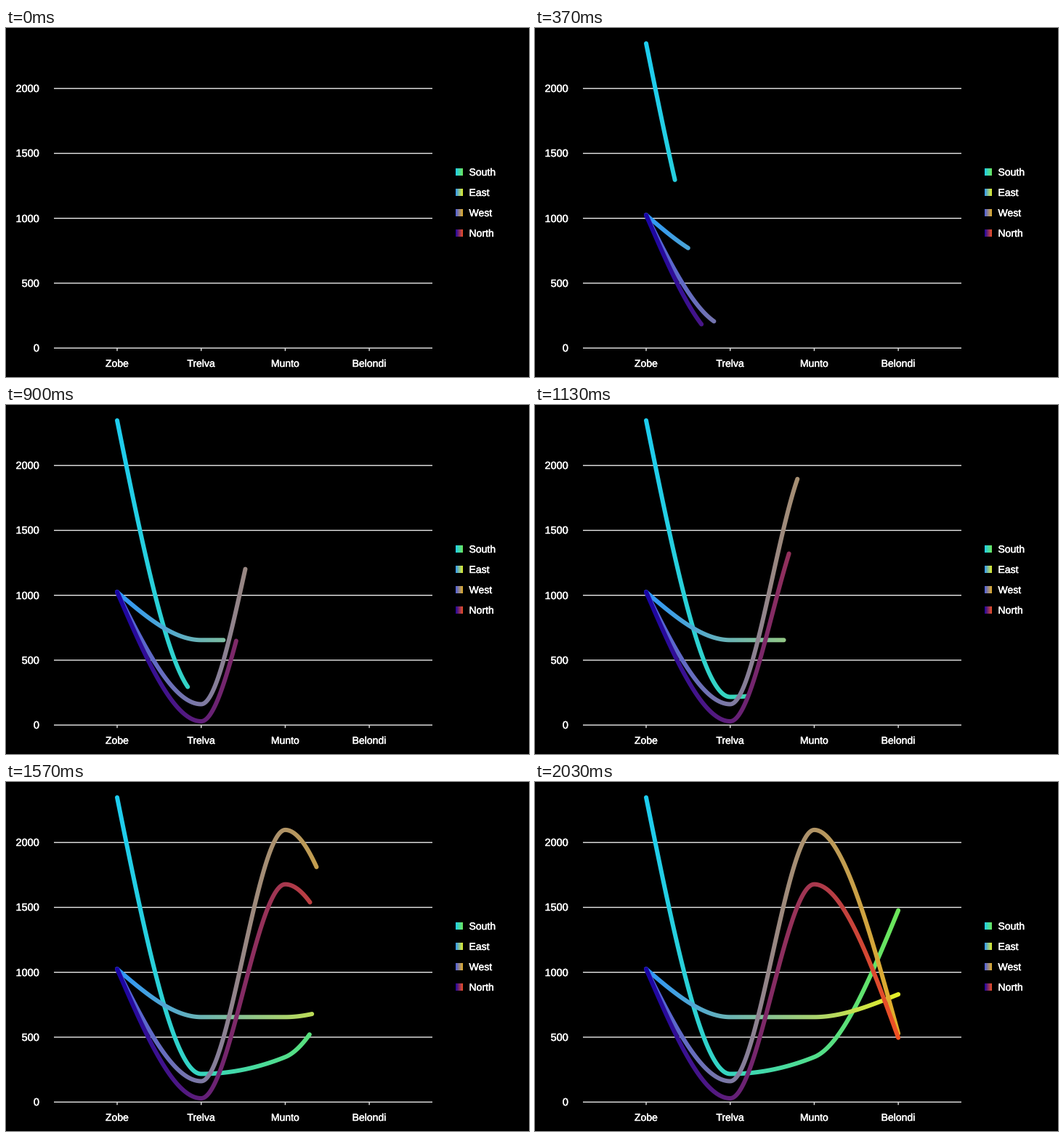
Write a matplotlib script that moves like this. It is 720x480 px and loops after 2060 ms.

```python
import numpy as np
import matplotlib.pyplot as plt
from matplotlib.animation import FuncAnimation
from matplotlib.colors import to_rgb
from matplotlib.patheffects import withStroke
from matplotlib.path import Path

W, H, DPI = 720, 480, 100
FRAMES, LOOP, DRAW = 62, 2060, 2005   # count, ms, ms
PT = 72 / DPI                         # points per pixel

LEFT, RIGHT, BASE, UNIT = 66, 587, 440.2, 0.1785
X0, STEP = 153, 115.7
RADIUS = 3

CATEGORIES = ["Zobe", "Trelva", "Munto", "Belondi"]
SERIES = [
    ("South", [2347, 217, 347, 1477], "#1ecdf0", "#6ce65a"),
    ("East", [1025, 655, 655, 830], "#2d96fa", "#e6f028"),
    ("West", [1025, 161, 2097, 528], "#4b5fe1", "#e4af28"),
    ("North", [1025, 29, 1678, 496], "#1905a5", "#f05223"),
]

fig = plt.figure(figsize=(W / DPI, H / DPI), dpi=DPI, facecolor="black")
ax = fig.add_axes([0, 0, 1, 1])
ax.axis("off")


def to_y(value):
    return BASE - value * UNIT


def label(x, y, text, ha, size=14):
    ax.text(x, y + 5, text, color="white", ha=ha, va="baseline",
            family="Liberation Sans", size=size * PT,
            path_effects=[withStroke(linewidth=0.4 * PT, foreground="white")])


def rule(xs, ys):
    ax.plot(xs, ys, color="#e8e8e8", lw=1.4 * PT, snap=False,
            solid_capstyle="butt", zorder=1)


def gradient(first, last, x0, x1, box):
    """Horizontal colour ramp from x0 to x1, filling box (l, r, b, t)."""
    xs = np.arange(box[0], box[1]) + 0.5
    mix = np.clip((xs - x0) / (x1 - x0), 0, 1)[:, None]
    row = (1 - mix) * to_rgb(first) + mix * to_rgb(last)
    return ax.imshow(row[None], extent=box, aspect="auto",
                     interpolation="nearest", zorder=3)


class Curve:
    """Monotone cubic through evenly spaced points, revealed piece by piece."""

    def __init__(self, values):
        self.y = to_y(np.array(values, float))
        s = np.diff(self.y) / STEP
        a, b = s[:-1], s[1:]
        inner = (np.sign(a) + np.sign(b)) * np.minimum(
            np.minimum(abs(a), abs(b)), abs(a + b) / 4)
        self.m = np.r_[(3 * s[0] - inner[0]) / 2, inner,
                       (3 * s[-1] - inner[-1]) / 2]
        n = 200
        x, y, _ = self.at(np.linspace(0, len(s), len(s) * n + 1))
        length = np.r_[0, np.cumsum(np.hypot(np.diff(x), np.diff(y)))]
        self.stops = length[::n] / length[-1]

    def at(self, s):
        k = np.minimum(s.astype(int), len(self.y) - 2)
        u = s - k
        y0, y1 = self.y[k], self.y[k + 1]
        m0, m1 = self.m[k] * STEP, self.m[k + 1] * STEP
        c2 = 3 * (y1 - y0) - 2 * m0 - m1
        c3 = 2 * (y0 - y1) + m0 + m1
        y = y0 + u * (m0 + u * (c2 + u * c3))
        slope = (m0 + u * (2 * c2 + 3 * u * c3)) / STEP
        return X0 + STEP * s, y, np.arctan(slope)

    def outline(self, progress):
        """Round-capped stroke outline of the visible part."""
        end = np.interp(progress, self.stops, np.arange(len(self.y)))
        x, y, th = self.at(np.linspace(0, end, int(end * 90) + 12))
        half = np.linspace(np.pi / 2, -np.pi / 2, 16)
        px = np.r_[x, np.full(16, x[-1]), x[::-1], np.full(16, x[0])]
        py = np.r_[y, np.full(16, y[-1]), y[::-1], np.full(16, y[0])]
        ang = np.r_[th + np.pi / 2, th[-1] + half,
                    th[::-1] - np.pi / 2, th[0] + half - np.pi]
        pts = np.c_[px + RADIUS * np.cos(ang), py + RADIUS * np.sin(ang)]
        return Path(np.r_[pts, pts[:1]], closed=True)


for value in range(0, 2001, 500):
    rule([LEFT, RIGHT], [to_y(value)] * 2)
    label(46, round(to_y(value)), str(value), "right", 14.5)

for i, name in enumerate(CATEGORIES):
    x = X0 + STEP * i
    rule([x, x], [BASE, BASE + 4])
    label(x, 461, name, "center")

lines = []
for i, (name, values, first, last) in enumerate(SERIES):
    y = 198 + 28 * i
    gradient(first, last, 619, 629, (619, 629, y + 5, y - 5))
    label(637.5, y, name, "left")
    ramp = gradient(first, last, X0, X0 + 3 * STEP, (147, 506, H, 0))
    lines.append((Curve(values), ramp))

ax.set_xlim(0, W)
ax.set_ylim(H, 0)


def draw(frame):
    progress = min(frame * LOOP / FRAMES / DRAW, 1)
    for curve, ramp in lines:
        ramp.set_visible(progress > 0)
        if progress > 0:
            ramp.set_clip_path(curve.outline(progress), ax.transData)
    return [ramp for _, ramp in lines]


anim = FuncAnimation(fig, draw, frames=FRAMES, interval=LOOP / FRAMES,
                     repeat=True, repeat_delay=0, blit=False)
plt.show()
```
